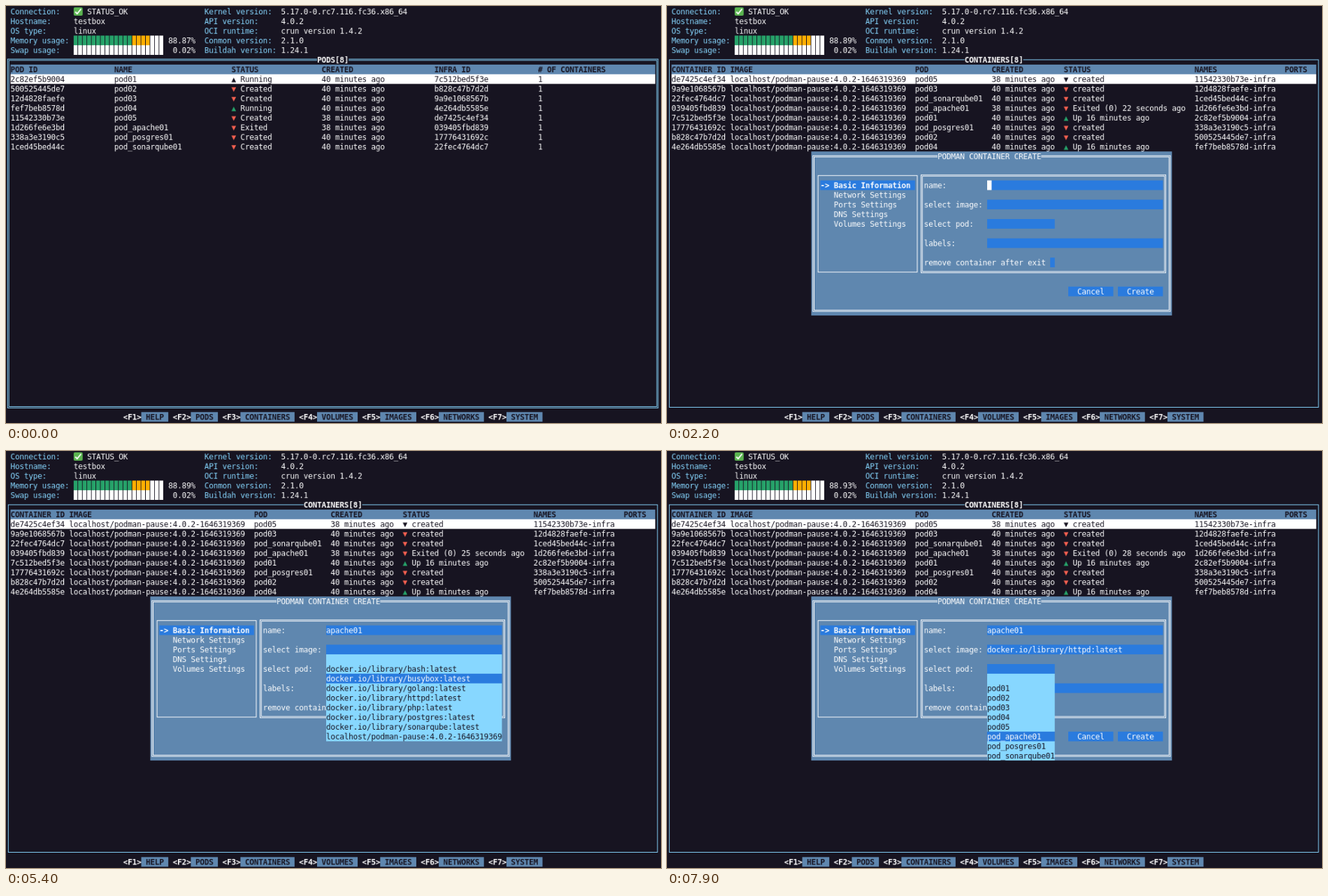
Animation of 937 by 597 pixels, one loop 8000 ms. Source, as an HTML page with a canvas:

```html
<!DOCTYPE html>
<html lang="en">
<head>
<meta charset="utf-8">
<title>Container terminal UI</title>
<style>
  html, body { margin: 0; width: 937px; height: 597px; overflow: hidden; background: #171421; }
  canvas { display: block; width: 937px; height: 597px; }
</style>
</head>
<body>
<canvas id="term" width="1017" height="648"></canvas>
<script>
const ctx = document.getElementById('term').getContext('2d');
const LOOP = 8000, CW = 7, CH = 15, TOP = 1, COLS = 145;
const DARK = '#171421', WHITE = '#ffffff', STEEL = '#5f87af', SKY = '#87d7ff';
const BLUE = '#2a7bde', NAVY = '#12488b', GREEN = '#26a269', RED = '#f66151', AMBER = '#ffaf00';

// [time, value] tables
const MEMORY = [[0, '88.87%'], [500, '88.89%'], [7600, '88.93%']];
const SECONDS = [[0, 20], [1500, 21], [2200, 22], [2800, 23], [3700, 24], [4700, 25], [5700, 26], [6800, 27], [7800, 28]];
const SCREEN = [[0, 'pods'], [700, 'containers'], [1500, 'commands'], [2200, 'create']];
const FOCUS = [[0, 'name'], [4500, 'image'], [4700, 'imageList'], [6300, 'image'], [6500, 'pod'], [6800, 'podList']];
const TYPED = [[0, 0], [2800, 1], [3000, 2], [3200, 3], [3300, 4], [3400, 5], [3600, 6], [3700, 7], [4100, 8]];
const IMAGE_PICK = [[0, 0], [5200, 1], [5400, 2], [5500, 3], [5700, 4]];
const POD_PICK = [[0, 0], [7100, 1], [7300, 2], [7400, 3], [7600, 4], [7800, 5], [7900, 6]];

const PAUSE = 'localhost/podman-pause:4.0.2-1646319369';
const IMAGES = ['', ...['bash', 'busybox', 'golang', 'httpd', 'php', 'postgres', 'sonarqube']
  .map(n => `docker.io/library/${n}:latest`), PAUSE];
const POD_NAMES = ['pod01', 'pod02', 'pod03', 'pod04', 'pod05', 'pod_apache01', 'pod_posgres01', 'pod_sonarqube01'];

// pod id, name, status, age, infra id
const PODS = [
  ['2c82ef5b9004', 'pod01', 'Running', 40, '7c512bed5f3e'],
  ['500525445de7', 'pod02', 'Created', 40, 'b828c47b7d2d'],
  ['12d4828faefe', 'pod03', 'Created', 40, '9a9e1068567b'],
  ['fef7beb8578d', 'pod04', 'Running', 40, '4e264db5585e'],
  ['11542330b73e', 'pod05', 'Created', 38, 'de7425c4ef34'],
  ['1d266fe6e3bd', 'pod_apache01', 'Exited', 38, '039405fbd839'],
  ['338a3e3190c5', 'pod_posgres01', 'Created', 40, '17776431692c'],
  ['1ced45bed44c', 'pod_sonarqube01', 'Created', 40, '22fec4764dc7']
];
const CONTAINER_ORDER = [4, 2, 7, 5, 0, 6, 1, 3];

const COMMANDS = [
  ['create', 'create a new container but do not start'],
  ['diff', "inspect changes to the selected container's file systems"],
  ['exec', 'execute the specified command inside a running container'],
  ['inspect', 'display the configuration of a container'],
  ['kill', 'kill the selected running container with a SIGKILL signal'],
  ['logs', 'fetch the logs of the selected container'],
  ['pause', 'pause all the processes in the selected container'],
  ['port', 'list port mappings for the selected container'],
  ['prune', 'remove all non running containers'],
  ['rename', 'rename the selected container'],
  ['rm', 'remove the selected container'],
  ['start', 'start the selected containers'],
  ['stats', 'display container resource usage statistics'],
  ['stop', 'stop the selected containers'],
  ['top', 'display the running processes of the selected container'],
  ['unpause', 'unpause the selected container that was paused before']
];

const at = (table, t) => table.reduce((v, [time, value]) => time <= t ? value : v, table[0][1]);

function fill(col, row, cols, rows, color) {
  ctx.fillStyle = color;
  ctx.fillRect(col * CW, TOP + row * CH, cols * CW, rows * CH);
}

function put(col, row, text, color = WHITE, bold = false) {
  ctx.font = `${bold ? 'bold ' : ''}12px "DejaVu Sans Mono", monospace`;
  ctx.fillStyle = color;
  [...text].forEach((ch, i) => {
    if (ch !== ' ') ctx.fillText(ch, (col + i) * CW, TOP + row * CH + 12);
  });
}

// Frame through the centres of its corner cells
function frame(c1, r1, c2, r2, color, double) {
  ctx.strokeStyle = color;
  ctx.lineWidth = 1;
  const x = c1 * CW + 3.5, y = TOP + r1 * CH + 7.5;
  const w = (c2 - c1) * CW, h = (r2 - r1) * CH;
  for (const d of double ? [-1, 1] : [0]) ctx.strokeRect(x + d, y + d, w - 2 * d, h - 2 * d);
}

function title(col, row, text, bg, bold) {
  fill(col, row, text.length, 1, bg);
  put(col, row, text, WHITE, bold);
}

function button(col, row, cols, text, bg = BLUE, color = WHITE) {
  fill(col, row, cols, 1, bg);
  put(col + 2, row, text, color);
}

function meter(row, colorOf) {
  for (let i = 0; i < 20; i++) {
    ctx.fillStyle = colorOf(i);
    ctx.fillRect((15 + i) * CW, TOP + row * CH, CW - 1, CH);
  }
}

function checkMark() {
  ctx.fillStyle = '#5bb450';
  ctx.beginPath();
  ctx.roundRect(105, 2, 14, 13, 2);
  ctx.fill();
  ctx.strokeStyle = WHITE;
  ctx.lineWidth = 2;
  ctx.beginPath();
  ctx.moveTo(107.5, 9);
  ctx.lineTo(110.5, 12);
  ctx.lineTo(116.5, 4.5);
  ctx.stroke();
}

function header(t) {
  ['Connection:', 'Hostname:', 'OS type:', 'Memory usage:', 'Swap usage:'].forEach((s, i) => put(1, i, s, SKY));
  [['Kernel version:', '5.17.0-0.rc7.116.fc36.x86_64'], ['API version:', '4.0.2'],
   ['OCI runtime:', 'crun version 1.4.2'], ['Conmon version:', '2.1.0'], ['Buildah version:', '1.24.1']]
    .forEach(([label, value], i) => { put(44, i, label, SKY); put(61, i, value); });
  checkMark();
  put(18, 0, 'STATUS_OK');
  put(15, 1, 'testbox');
  put(15, 2, 'linux');
  meter(3, i => i < 13 ? GREEN : i < 17 ? AMBER : WHITE);
  meter(4, () => WHITE);
  put(36, 3, at(MEMORY, t));
  put(37, 4, '0.02%');
}

function footer() {
  let col = 26;
  ['HELP', 'PODS', 'CONTAINERS', 'VOLUMES', 'IMAGES', 'NETWORKS', 'SYSTEM'].forEach((name, i) => {
    put(col, 42, `<F${i + 1}>`, WHITE, true);
    fill(col + 4, 42, name.length + 2, 1, STEEL);
    put(col + 5, 42, name, DARK, true);
    col += name.length + 7;
  });
}

function table(cols, heads, rows, statusIndex) {
  fill(1, 6, 143, 1, STEEL);
  heads.forEach((h, i) => put(cols[i], 6, h, DARK, true));
  fill(1, 7, 143, 1, WHITE);
  rows.forEach((cells, r) => cells.forEach((text, i) => {
    const color = r ? WHITE : DARK;
    if (i === statusIndex) {
      const up = /^(Up|Running)/.test(text);
      put(cols[i], 7 + r, up ? '▲' : '▼', r ? (up ? GREEN : RED) : DARK);
      put(cols[i] + 2, 7 + r, text, color);
    } else put(cols[i], 7 + r, text, color);
  }));
}

function podTable() {
  title(69, 5, 'PODS[8]', DARK, true);
  table([1, 24, 50, 70, 95, 118], ['POD ID', 'NAME', 'STATUS', 'CREATED', 'INFRA ID', '# OF CONTAINERS'],
    PODS.map(([id, name, status, age, infra]) => [id, name, status, `${age} minutes ago`, infra, '1']), 2);
}

function containerTable(t) {
  title(66, 5, 'CONTAINERS[8]', DARK, true);
  const label = {
    Running: 'Up 16 minutes ago',
    Created: 'created',
    Exited: `Exited (0) ${at(SECONDS, t)} seconds ago`
  };
  table([1, 14, 55, 72, 88, 117, 137], ['CONTAINER ID', 'IMAGE', 'POD', 'CREATED', 'STATUS', 'NAMES', 'PORTS'],
    CONTAINER_ORDER.map(i => {
      const [id, name, status, age, infra] = PODS[i];
      return [infra, PAUSE, name, `${age} minutes ago`, label[status], `${id}-infra`];
    }), 4);
}

function commandDialog() {
  fill(36, 12, 72, 22, STEEL);
  frame(36, 12, 107, 33, WHITE, true);
  fill(38, 13, 68, 1, NAVY);
  put(38, 13, 'COMMAND', WHITE, true);
  put(70, 13, 'DESCRIPTION', WHITE, true);
  fill(38, 14, 68, 1, WHITE);
  COMMANDS.forEach(([name, about], i) => {
    const color = i ? WHITE : DARK;
    put(38, 14 + i, name, color);
    put(47, 14 + i, about, color);
  });
  button(86, 31, 10, 'Cancel');
  button(97, 31, 9, 'Enter', WHITE, BLUE);
}

function field(row, cols, text, focused) {
  fill(71, row, cols, 1, focused ? WHITE : BLUE);
  put(71, row, text, focused ? BLUE : WHITE);
}

function dropdown(row, cols, items, pick) {
  items.forEach((text, i) => {
    fill(71, row + i, cols, 1, i === pick ? BLUE : SKY);
    put(71, row + i, text, i === pick ? WHITE : DARK);
  });
}

function createDialog(t) {
  const focus = at(FOCUS, t), typed = at(TYPED, t);
  fill(32, 15, 80, 17, STEEL);
  frame(32, 15, 111, 31, WHITE, true);
  title(60, 15, 'PODMAN CONTAINER CREATE', STEEL);

  frame(33, 17, 55, 27, WHITE);
  fill(34, 18, 21, 1, BLUE);
  put(34, 18, '-> Basic Information', WHITE, true);
  ['Network', 'Ports', 'DNS', 'Volumes'].forEach((s, i) => put(37, 19 + i, s + ' Settings'));

  frame(56, 17, 110, 27, WHITE, true);
  ['name:', 'select image:', 'select pod:', 'labels:', 'remove container after exit']
    .forEach((s, i) => put(57, 18 + 2 * i, s));
  field(18, 39, 'apache01'.slice(0, typed));
  if (focus === 'name') fill(71 + typed, 18, 1, 1, WHITE);
  field(20, 39, t >= 6300 ? IMAGES[4] : '', focus === 'image');
  field(22, 15, '', focus === 'pod');
  field(24, 39, '');
  fill(85, 26, 1, 1, BLUE);
  button(89, 29, 10, 'Cancel');
  button(100, 29, 10, 'Create');

  if (focus === 'imageList') dropdown(21, 39, IMAGES, at(IMAGE_PICK, t));
  if (focus === 'podList') dropdown(23, 15, ['', ...POD_NAMES], at(POD_PICK, t));
}

function draw(t) {
  const screen = at(SCREEN, t);
  ctx.fillStyle = DARK;
  ctx.fillRect(0, 0, 1017, 648);
  header(t);
  frame(0, 5, COLS - 1, 41, SKY, screen === 'pods' || screen === 'containers');
  if (screen === 'pods') podTable();
  else containerTable(t);
  if (screen === 'commands') commandDialog();
  if (screen === 'create') createDialog(t);
  footer();
}

const start = performance.now();
let lastTick = -1;
function loop() {
  const tick = Math.floor((performance.now() - start) % LOOP / 100);
  if (tick !== lastTick) draw((lastTick = tick) * 100);
  requestAnimationFrame(loop);
}
loop();
</script>
</body>
</html>
```
